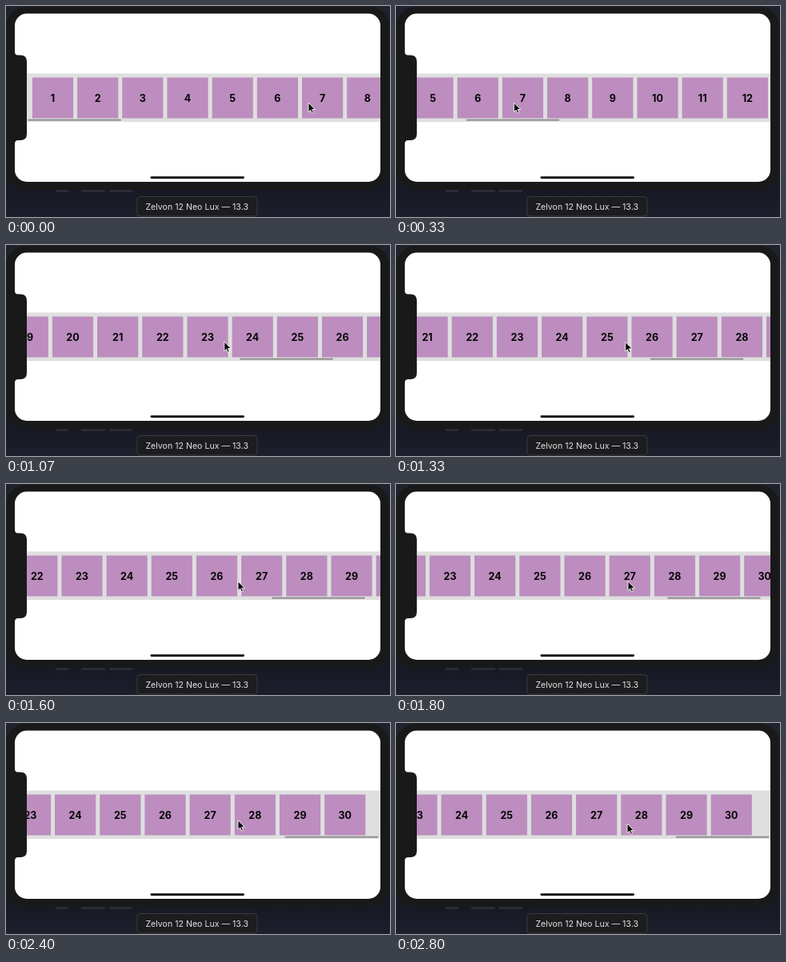
An HTML page for the animation above (2870 ms loop, 480 by 264 pixels).

```html
<!DOCTYPE html>
<html lang="en">
<head>
<meta charset="utf-8">
<title>Horizontal scroll</title>
<style>
  html, body { margin: 0; width: 100%; height: 100%; overflow: hidden; background: #1c1f2b; }
  svg { display: block; width: 480px; height: 264px; font-family: Inter, "Liberation Sans", sans-serif; }
  .num { font-size: 12.5px; font-weight: 700; fill: #050505; text-anchor: middle; }
  .label { font-size: 10.6px; fill: #e2e2e3; text-anchor: middle; }
</style>
</head>
<body>
<svg viewBox="0 0 480 264">
  <defs>
    <linearGradient id="desk" x2="0" y2="1">
      <stop offset="0" stop-color="#20222e"/>
      <stop offset=".88" stop-color="#171a25"/>
      <stop offset="1" stop-color="#1d202c"/>
    </linearGradient>
    <clipPath id="view"><rect x="26" y="84" width="442" height="62"/></clipPath>
  </defs>
  <rect width="480" height="264" fill="url(#desk)"/>
  <g fill="#292c36">
    <rect x="62" y="229" width="16" height="4" rx="1"/>
    <rect x="94" y="229" width="30" height="4" rx="1"/>
    <rect x="129" y="229" width="29" height="4" rx="1"/>
  </g>

  <!-- device -->
  <rect y="1" width="479.5" height="229" rx="25" fill="#191919"/>
  <rect x="11" y="9.5" width="457" height="210.5" rx="15" fill="#fff"/>
  <g clip-path="url(#view)">
    <rect x="26" y="84.5" width="442" height="60.5" fill="#dfdfdf"/>
    <g id="strip"></g>
    <rect id="bar" y="141.8" width="116.5" height="1.8" rx=".9" fill="#858585"/>
  </g>
  <path d="M10 57H11Q11 61.5 15 61.5H18Q26 61.5 26 69.5V160Q26 168 18 168H15Q11 168 11 172.500H10Z" fill="#191919"/>
  <rect x="180.500" y="213.200" width="117.500" height="2.800" rx="1.400" fill="#050505"/>

  <rect x="164" y="238.500" width="150" height="24.500" rx="4" fill="#1d1d20" stroke="#3c3c40"/>
  <text class="label" x="238.700" y="254.700">Zelvon 12 Neo Lux — 13.3</text>

  <path id="cursor" d="M0 0V11.700L2.700 9.200L4.500 13.300L6.500 12.400L4.700 8.500H8.400Z"
    fill="#050505" stroke="#fff" stroke-width=".9" stroke-linejoin="round"/>
</svg>
<script>
const LOOP = 2870, STEP = 200 / 3;
const PITCH = 56.18, TILE = 51.2, COUNT = 30;
const RELEASE = 330, SCROLL_END = 1272, POINTER_END = 291;

// Distance still to go, as [ms, px]
const scrollLeft = [[330, 1042], [670, 517], [1070, 228], [1600, 72.5], [2000, 28], [2400, 8], [2800, 3.5]];
const pointerLeft = [[420, 159], [670, 66], [1070, 18], [1600, 1], [2800, 1]];

const byId = id => document.getElementById(id);
const strip = byId('strip'), bar = byId('bar'), cursor = byId('cursor');
const clamp = v => Math.min(1, Math.max(0, v));

strip.innerHTML = Array.from({ length: COUNT }, (_, i) => {
  const mid = 58.5 + i * PITCH;
  return `<rect x="${mid - TILE / 2}" y="89.5" width="${TILE}" height="51" fill="#bc8dbe"/>` +
    `<text class="num" x="${mid}" y="119.5">${i + 1}</text>`;
}).join('');

// Exponential decay between neighbouring points
function decay(points, t) {
  let i = 1;
  while (i < points.length - 1 && t > points[i][0]) i++;
  const [t0, a] = points[i - 1], [t1, b] = points[i];
  return a * (b / a) ** clamp((t - t0) / (t1 - t0));
}

function scrollAt(t) {
  if (t < RELEASE) return 230 * clamp((t - 30) / 300) ** 2.4;
  return SCROLL_END - decay(scrollLeft, t);
}

function pointerAt(t) {
  if (t < RELEASE) return [378 - scrollAt(t), 121];
  if (t < 420) return [148 - 16 * (t - RELEASE) / 90, 121];
  const drop = clamp((t - 2600) / 200);
  return [POINTER_END - decay(pointerLeft, t) - drop,
    121 + 0.7 * clamp((t - 1070) / 530) + 4.3 * drop];
}

function draw(now) {
  // The picture is held for about 67 ms, with changes on whole 10 ms marks
  const mark = Math.floor(now % LOOP / 10) * 10;
  const t = Math.floor(mark / STEP + 0.06) * STEP;
  const s = scrollAt(t);
  strip.setAttribute('transform', `translate(${-s} 0)`);
  bar.setAttribute('x', 27.5 + s * 0.254);
  cursor.setAttribute('transform', `translate(${pointerAt(t)})`);
}

const start = performance.now();
function tick() {
  draw(performance.now() - start);
  requestAnimationFrame(tick);
}
tick();
</script>
</body>
</html>
```
